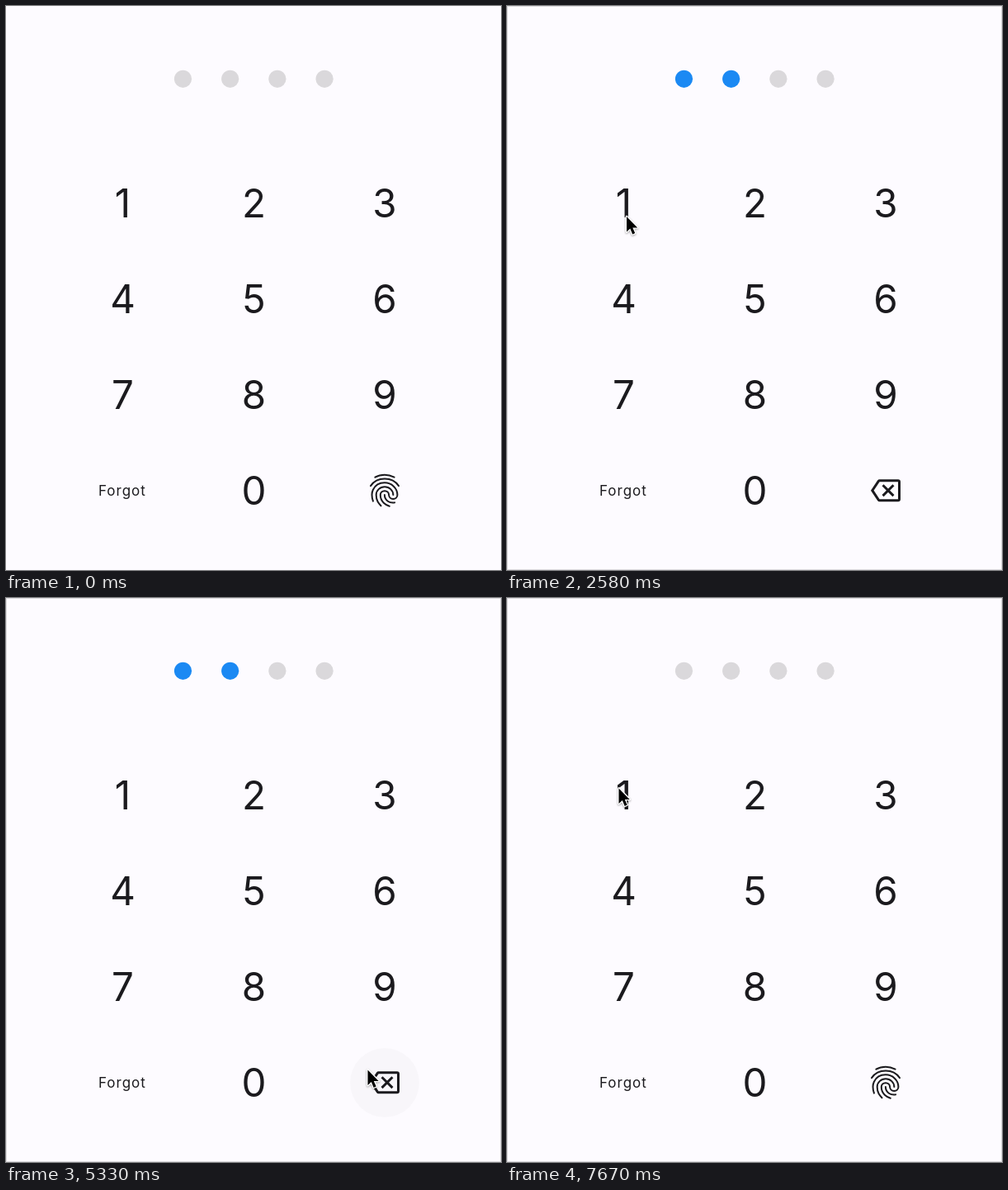
An HTML page that plays this animation: 600 px wide and 683 px high, repeating every 8000 ms.

```html
<!DOCTYPE html>
<html lang="en">
<head>
<meta charset="utf-8">
<title>PIN pad</title>
<style>
  html, body { margin: 0; width: 100%; height: 100%; overflow: hidden; background: #fdfbff; }
  svg { display: block; width: 600px; height: 683px; }
  text { font-family: Inter, "Liberation Sans", sans-serif; fill: #1b1a1e; }
  #keys text { font-size: 47.5px; text-anchor: middle; }
  #arrow { filter: drop-shadow(0 1.5px 1.2px rgba(0, 0, 0, .35)); }
</style>
</head>
<body>
<svg viewBox="0 0 600 683">
  <rect width="600" height="683" fill="#fdfbff"/>
  <rect id="border" x=".5" y=".5" width="599" height="682" fill="none" stroke="#dddbdf"/>
  <g id="dots"></g>
  <circle id="ripple" r="42" fill="#1b1a1e"/>
  <g id="keys"></g>
  <text x="112" y="593" font-size="17" letter-spacing="1">Forgot</text>
  <g id="finger" transform="translate(435 562.7) scale(2)" fill="none" stroke="#1b1a1e" stroke-linecap="round">
    <path d="M17.8 3.97C15.7 2.9 14 2.5 12 2.5S7.9 3 6.2 3.97"/>
    <path d="M3.5 9.2C5.4 6.4 8.5 4.9 12 4.9s6.6 1.5 8.5 4.3"/>
    <path d="M9.75 21.29C8.9 20.4 8.46 19.9 7.8 18.75 7.16 17.6 6.84 16.2 6.84 14.66c0-2.69 2.31-4.89 5.16-4.89s5.16 2.2 5.16 4.89"/>
    <path d="M11.94 14.66c0 1.58.8 3.06 2.16 3.98.79.53 1.72.8 2.82.8.3 0 .75-.03 1.13-.1"/>
    <path d="M14.91 21.5c-1.5-.41-2.47-.97-3.5-1.97-1.3-1.3-2.02-3.02-2.02-4.87 0-1.35 1.16-2.44 2.58-2.44s2.58 1.09 2.58 2.44 1.16 2.44 2.58 2.44 2.58-1.09 2.58-2.44c0-4.04-3.48-7.33-7.75-7.33-3.04 0-5.81 1.69-7.06 4.31-.42.88-.64 1.9-.64 3.02 0 .83.08 2.13.71 3.79"/>
  </g>
  <g id="erase" transform="translate(441 568.7) scale(1.5)" fill="none" stroke="#1b1a1e" stroke-width="2">
    <path d="M7 4H22Q23 4 23 5V19Q23 20 22 20H7Q6.55 20 6.24 19.55L1.2 12 6.24 4.45Q6.55 4 7 4Z"/>
    <path d="M9.7 7.7l8.6 8.6m0-8.6l-8.6 8.6"/>
  </g>
  <g id="pointer">
    <g id="ring" fill="none">
      <circle cx="-.5" cy="2" r="29" stroke="#fff" stroke-width="4" stroke-opacity=".8"/>
      <circle cx="-.5" cy="2" r="29" stroke="#000" stroke-width="2"/>
    </g>
    <path id="arrow" d="M0 0V18.6L4.3 14.6 7.2 21.4 10.2 20.1 7.3 13.5H13.2Z" fill="#000" stroke="#fff" stroke-width="2.6" paint-order="stroke" stroke-linejoin="round"/>
  </g>
</svg>
<script>
const FPS = 12, LOOP = 8000;
const NS = 'http://www.w3.org/2000/svg';
const $ = id => document.getElementById(id);
const cols = [141.5, 300.5, 459], rows = [256, 372, 488, 604];

function add(parent, tag, attrs, text = '') {
  const el = document.createElementNS(NS, tag);
  for (const k in attrs) el.setAttribute(k, attrs[k]);
  el.textContent = text;
  parent.append(el);
  return el;
}

for (let n = 1; n <= 9; n++)
  add($('keys'), 'text', { x: cols[(n - 1) % 3], y: rows[Math.floor((n - 1) / 3)] }, n);
add($('keys'), 'text', { x: cols[1], y: rows[3] }, 0);

const dots = [0, 1, 2, 3].map(i =>
  add($('dots'), 'circle', { cx: 214.5 + i * 57.2, cy: 88.3 }));

// Times below are ticks of 1/12 s.
const presses = [
  { at: 19, dot: 0, on: true },
  { at: 26, dot: 1, on: true },
  { at: 34, dot: 2, on: true },
  { at: 60, dot: 2, on: false },
  { at: 68, dot: 1, on: false },
  { at: 76, dot: 0, on: false }
];
const RING = 2;
const ripple = [0, .04, .06, .05, .02];
const pop = [1.12, 1.35, 1.15];
const tint = [.55, 1];

// tick, x, y
const path = [
  [4, 310, 700], [13, 145, 255], [41, 145, 255], [53, 426.5, 558.5],
  [54, 426.5, 558.5], [56, 436.5, 570], [58, 438.5, 571.5],
  [82, 438.5, 571.5], [92, 135.5, 230.5], [96, 135.5, 230.5]
];
const ease = p => p * p * (3 - 2 * p);
const mix = (a, b, p) => a + (b - a) * p;

function place(tick) {
  const i = Math.max(1, path.findIndex(p => p[0] >= tick));
  const [a, b] = [path[i - 1], path[i]];
  const p = ease(Math.max(0, (tick - a[0]) / (b[0] - a[0])));
  return [mix(a[1], b[1], p), mix(a[2], b[2], p)];
}

const grey = [218, 216, 219], blue = [27, 137, 243];
const shade = p => `rgb(${grey.map((c, i) => Math.round(mix(c, blue[i], p)))})`;
const show = (id, on) => $(id).setAttribute('visibility', on ? 'visible' : 'hidden');

function draw(tick) {
  const level = [0, 0, 0, 0], size = [1, 1, 1, 1];
  let ring = false, glow = 0, button = [cols[0], 239];
  for (const { at, dot, on } of presses) {
    const age = tick - at, after = age - RING;
    if (age < 0) continue;
    if (age < RING) ring = true;
    if (ripple[age]) {
      glow = ripple[age];
      button = at < 50 ? [cols[0], 239] : [cols[2], 587];
    }
    if (after < 0) continue;
    const p = tint[after] ?? 1;
    level[dot] = on ? p : 1 - p;
    size[dot] = on ? pop[after] ?? 1 : 1;
  }
  dots.forEach((d, i) => {
    d.setAttribute('fill', shade(level[i]));
    d.setAttribute('r', 10.6 * size[i]);
  });
  $('ripple').setAttribute('cx', button[0]);
  $('ripple').setAttribute('cy', button[1]);
  $('ripple').setAttribute('opacity', glow);
  const filled = tick >= presses[0].at + RING && tick < presses[5].at + RING;
  show('finger', !filled);
  show('erase', filled);
  show('border', tick >= 5);
  show('arrow', tick >= 5);
  show('ring', ring);
  $('pointer').setAttribute('transform', `translate(${place(tick)})`);
}

const start = performance.now();
function frame(now) {
  const t = Math.max(0, now - start) % LOOP;
  draw(Math.floor((t + 5) * FPS / 1000) % (LOOP * FPS / 1000));
  requestAnimationFrame(frame);
}
draw(0);
requestAnimationFrame(frame);
</script>
</body>
</html>
```
